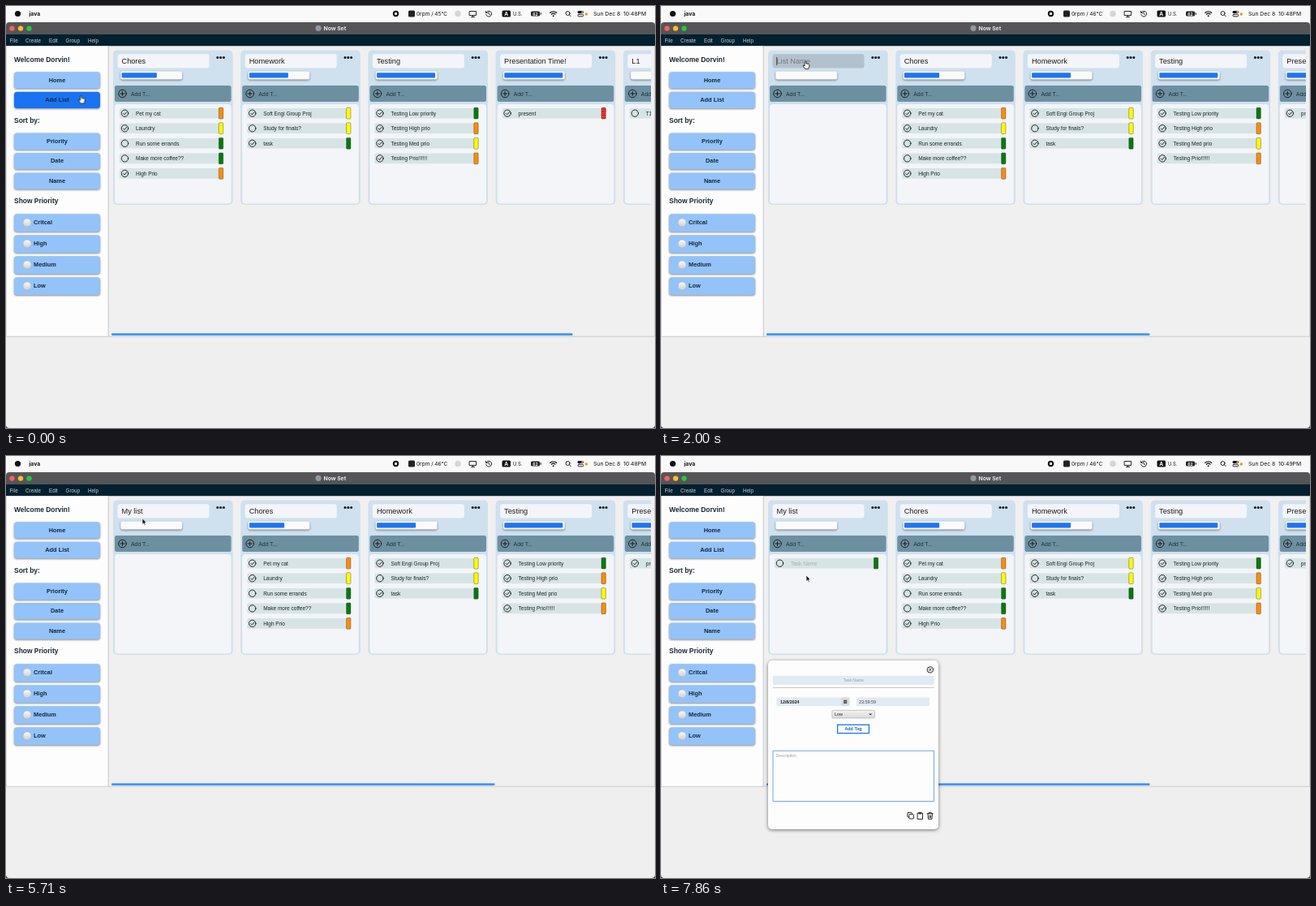
These frames come from a looping animation (800 by 520 pixels, 8 s). An HTML page:

```html
<!DOCTYPE html>
<html lang="en">
<head>
<meta charset="utf-8">
<title>To-do board</title>
<style>
  html, body { margin: 0; width: 100%; height: 100%; overflow: hidden; background: #efefef; }
  svg { display: block; width: 800px; height: 520px; }
  text { font-family: "Liberation Sans", Arial, sans-serif; white-space: pre; }
  .sys { font: 6.8px Inter, sans-serif; fill: #111; }
  .b { font-weight: bold; }
  .mid { text-anchor: middle; }
  .menu { font-size: 6.3px; fill: #c3ccd1; }
  .head { font-size: 8.45px; font-weight: bold; fill: #1b2733; }
  .label { font-size: 7.4px; font-weight: bold; fill: #12283f; }
  .title { font-size: 9.2px; fill: #1c1c1c; }
  .task { font-size: 6.5px; fill: #1c2426; }
  .addText { font-size: 6.9px; fill: #1f323d; }
  .small { font-size: 5.4px; fill: #222; }
  .hint { font-size: 5px; fill: #9a9fa3; }
  .btn { fill: #93c3f9; filter: drop-shadow(0 1px 1px #0007); }
  .bar { fill: #fafafa; filter: drop-shadow(0 1px 1px #0007); }
  .field { fill: #f3f5f9; }
  .add { fill: #6d90a1; }
  .line { fill: none; stroke: #111; stroke-width: .9; stroke-linecap: round; stroke-linejoin: round; }
</style>
</head>
<body>
<svg id="stage" viewBox="0 0 800 520" xmlns="http://www.w3.org/2000/svg"></svg>
<script>
const LOOP = 8000, TICK = 1000 / 7, TICKS = 56, PITCH = 157.2;
const NORMAL = '#6d90a1', PRESSED = '#02517f';
const ORANGE = '#ff8c0a', YELLOW = '#fffb00', GREEN = '#067a0c', RED = 'url(#critical)';

const rect = (x, y, w, h, fill, r = 0, extra = '') =>
  `<rect x="${x}" y="${y}" width="${w}" height="${h}" rx="${r}" fill="${fill}" ${extra}/>`;
const circle = (x, y, r, fill, extra = '') =>
  `<circle cx="${x}" cy="${y}" r="${r}" fill="${fill}" ${extra}/>`;
const text = (x, y, cls, s, extra = '') =>
  `<text x="${x}" y="${y}" class="${cls}" ${extra}>${s}</text>`;
const line = (d, extra = '') => `<path class="line" d="${d}" ${extra}/>`;

const defs = `<defs>
  <clipPath id="board"><rect x="127" y="50" width="668" height="352"/></clipPath>
  <linearGradient id="knob" x2="0" y2="1"><stop stop-color="#fafafa"/><stop offset="1" stop-color="#cfcfcf"/></linearGradient>
  <linearGradient id="combo" x2="0" y2="1"><stop stop-color="#f4f4f4"/><stop offset="1" stop-color="#d8d8d8"/></linearGradient>
  <pattern id="critical" width="2.6" height="2.6" patternUnits="userSpaceOnUse">
    <rect width="2.6" height="2.6" fill="#f01818"/><circle cx="1.3" cy="1.3" r=".45" fill="#ffd0c8"/></pattern>
</defs>`;

function menuBar() {
  return rect(0, 0, 800, 24, '#f9f9f9') +
    circle(14.5, 9.5, 3.6, '#111') +
    text(28.5, 12, 'sys b', 'java') +
    circle(480.5, 9.5, 3.7, '#111') + rect(479.1, 8.1, 2.8, 2.8, '#fff', .5) +
    rect(496, 5.5, 8, 8, '#222', 1.5) +
    text(506, 12, 'sys', '0rpm / 45°C', 'id="cool" style="font-size:6.5px"') +
    text(506, 12, 'sys', '0rpm / 46°C', 'id="warm" style="font-size:6.5px"') +
    circle(557, 9.5, 3.8, '#d6d6d6') +
    line('M571.5 6.5h8v5h-8zM573.5 13.5h4M575.5 11.5v2') +
    line('M592 8a3.5 3.5 0 1 1-.3 2.5M591.5 6.5v2h2M595 7.5v2.2l1.5 1') +
    rect(611.5, 5.5, 10.5, 8, '#111', 1.5) +
    text(616.8, 12, 'sys b mid', 'A', 'style="fill:#fff;font-size:6.5px"') +
    text(625, 12, 'sys', 'U.S.', 'style="font-size:6px"') +
    rect(647, 6.5, 11, 6, '#222', 1.5) + rect(658.6, 8.3, 1.2, 2.4, '#222') +
    text(652.5, 11.5, 'sys b mid', '62', 'style="fill:#fff;font-size:5px"') +
    line('M670.7 8.3a6 6 0 0 1 8 0M672.3 10.2a3.6 3.6 0 0 1 4.8 0', 'style="stroke-width:1.2"') +
    circle(674.7, 12.2, 1, '#111') +
    line('M694.4 10.9l1.8 1.8') + circle(692.5, 9, 2.5, 'none', 'class="line"') +
    rect(704.5, 6, 7.5, 3, '#111', 1.5) + circle(710.3, 7.5, .9, '#fff') +
    rect(704.9, 10.3, 6.8, 2.6, 'none', 1.3, 'class="line"') +
    circle(715.3, 10, 1.7, '#f5920b') +
    text(724, 12, 'sys', 'Sun Dec 8') +
    text(761, 12, 'sys', '10:48PM', 'id="early"') + text(761, 12, 'sys', '10:49PM', 'id="late"');
}

function windowFrame() {
  const menus = [[4.5, 'File'], [24, 'Create'], [53, 'Edit'], [73.5, 'Group'], [101, 'Help']];
  return `<path d="M0 36V24q0-4 4-4H796q4 0 4 4V36z" fill="#555457"/>` +
    ['#ff5f57', '#febc2e', '#28c840'].map((c, i) => circle(7.5 + 10.5 * i, 27.6, 3.2, c)).join('') +
    circle(385, 27.3, 3.6, '#8e9ba3') +
    text(391.5, 29.9, 'sys b', 'Now Set', 'style="fill:#e8e8e8"') +
    rect(0, 35, 800, 14.5, '#02202f') +
    menus.map(([x, s]) => text(x, 44.7, 'menu', s)).join('') +
    rect(0, 49.5, 800, 357.5, '#f0f0f0') +
    rect(0, 49.5, 126, 357.5, '#fdfdfd') +
    rect(125.7, 49.5, .9, 357.5, '#bfc3c7') +
    rect(0, 406.8, 800, .8, '#c4c4c4') +
    rect(0, 49.5, .6, 357.5, '#c4c4c4') + rect(799.3, 49.5, .7, 357.5, '#c9c9c9') +
    '<path d="M0 516q0 4 4 4H0zM800 516q0 4-4 4h4z" fill="#333"/>';
}

function sidebar() {
  const button = (cy, s, id = '') =>
    rect(10, cy - 9.7, 106, 20.3, '', 3.5, `class="btn" ${id}`) + text(63, cy + 2.6, 'label mid', s);
  const toggle = (s, i) => {
    const cy = 267 + 26 * i;
    return rect(10, cy - 10.8, 106, 21.8, '', 3.5, 'class="btn"') +
      circle(26, cy, 5, 'url(#knob)', 'stroke="#b5b5b5" stroke-width=".6"') + text(34, cy + 2.3, 'label', s);
  };
  return text(10, 68.6, 'head', 'Welcome Dorvin!') +
    button(91, 'Home') + button(115.4, 'Add List', 'id="addList"') +
    text(10, 143.9, 'head', 'Sort by:') +
    button(166.3, 'Priority') + button(190.7, 'Date') + button(215.2, 'Name') +
    text(10, 243.3, 'head', 'Show Priority') +
    ['Critcal', 'High', 'Medium', 'Low'].map(toggle).join('');
}

function taskRow([name, done, color], i) {
  const cy = 132.2 + 18.55 * i;
  return rect(140, cy - 6.3, 128, 12.6, '#d6e4e6', 2) +
    circle(146.5, cy, 4.2, 'none', 'class="line"') +
    (done ? line(`M144.7 ${cy + .2}l1.4 1.5 2.6-3.2`) : '') +
    text(160, cy + 2.3, 'task', name) +
    rect(262.4, cy - 6.9, 5.3, 13.8, color, 1, 'stroke="#000" stroke-opacity=".5" stroke-width=".6"');
}

function card(slot, title, tasks, extra = '') {
  const ratio = tasks.length ? tasks.filter(t => t[1]).length / tasks.length : 0;
  return `<g transform="translate(${slot * PITCH})" ${extra}>` +
    rect(132, 54.5, 147.6, 190.5, '#cfe0ee', 5) +
    rect(137.5, 59.2, 113, 17.2, '', 3, 'class="field"') +
    text(142.5, 71.3, 'title', title) +
    [260.8, 264.6, 268.4].map(x => circle(x, 63.6, 1.5, '#111')).join('') +
    rect(141.3, 80.5, 75.8, 10, '', 2, 'class="bar"') +
    (ratio ? rect(142.7, 82.2, 72 * ratio, 6.2, '#1d75f0', .8) : '') +
    rect(134, 98, 143.6, 20, '', 2.5, 'class="add"') +
    circle(143.5, 108, 4.8, 'none', 'class="line"') + line('M141 108h5M143.5 105.5v5') +
    text(154, 110.5, 'addText', 'Add T...') +
    rect(134, 121, 143.6, 122.5, '#f3f5f8', 4) +
    tasks.map(taskRow).join('') + '</g>';
}

const lists = [
  ['Chores', [['Pet my cat', 1, ORANGE], ['Laundry', 1, YELLOW], ['Run some errands', 0, GREEN],
    ['Make more coffee??', 0, GREEN], ['High Prio', 1, ORANGE]]],
  ['Homework', [['Soft Engi Group Proj', 1, YELLOW], ['Study for finals?', 0, YELLOW], ['task', 1, GREEN]]],
  ['Testing', [['Testing Low priority', 1, GREEN], ['Testing High prio', 1, ORANGE],
    ['Testing Med prio', 1, YELLOW], ['Testing Prio!!!!!!', 1, ORANGE]]],
  ['Presentation Time!', [['present', 1, RED]]],
  ['L1', [['T1', 0, GREEN]]]
];
const NAME = 'My list';

function board() {
  return `<g clip-path="url(#board)"><g id="lists">${lists.map((l, i) => card(i, ...l)).join('')}</g>` +
    card(0, '', [], 'id="fresh"') +
    text(142.5, 71.3, 'title', 'List Name', 'id="prompt" style="fill:#737a80"') +
    text(142.5, 71.3, 'title', [...NAME].map(c => `<tspan>${c}</tspan>`).join(''), 'id="typed"') +
    rect(142.4, 63, .8, 10, '#222', 0, 'id="caret"') +
    `<g id="newTask">${taskRow(['<tspan fill="#a3b0b3">Task Name</tspan>', 0, GREEN], 0)}</g></g>` +
    rect(130, 403.2, 568.5, 2.7, '#3f97f3', 1, 'id="scroll"');
}

function popup() {
  const field = '#e1ebf4';
  return '<g id="popup">' +
    rect(132, 252, 210, 208, '#fdfdfd', 5, 'style="filter:drop-shadow(0 1px 2px #0008)"') +
    circle(331.8, 263.4, 3.7, 'none', 'class="line"') + line('M330.4 262l2.8 2.8m0-2.8l-2.8 2.8') +
    rect(137.7, 270.7, 199, 11.3, field, 1.5) + text(237.2, 278.2, 'hint mid', 'Task Name') +
    rect(137.7, 285.2, 199, .7, '#b4b4b4') +
    rect(142.5, 297.5, 79, 10.5, field, 1) + text(147, 304.7, 'small b', '12/8/2024', 'style="font-size:5.3px"') +
    rect(221.5, 297.5, 11, 10.5, '#d3dde5', 1) + rect(225, 300.7, 4.2, 4.2, '#444', .5) +
    line('M225.4 302.3h3.4M225.4 303.7h3.4', 'style="stroke:#d3dde5;stroke-width:.4"') +
    rect(241, 297.5, 90, 10.5, field, 1) + text(244, 304.7, 'small', '23:59:59', 'style="fill:#444"') +
    rect(210.8, 313.4, 52.7, 9.6, 'url(#combo)', 1.5, 'stroke="#b2b2b2" stroke-width=".7"') +
    text(214, 320.2, 'small', 'Low') + '<path d="M256.2 317.4h4l-2 2.2z" fill="#333"/>' +
    rect(217.6, 331.2, 38.8, 10.4, '#fff', 0, 'stroke="#1a75e6" stroke-width="1.3"') +
    text(237, 338.3, 'small b mid', 'Add Tag', 'style="fill:#1a66d0"') +
    rect(138, 363.2, 198.4, 62.2, '#fdfdfd', 0, 'stroke="#5a9edb" stroke-width=".9"') +
    text(141.7, 370.6, 'hint', 'Description') +
    rect(303.8, 439.4, 5.6, 5.6, 'none', 1, 'class="line"') +
    rect(305.8, 441.4, 5.6, 5.6, '#fdfdfd', 1, 'style="stroke:#111;stroke-width:.9"') +
    line('M316.5 440h6v7.4h-6zM318.3 439.3h2.4v1.6h-2.4z') +
    line('M328.2 440.7h7M330.4 440.5v-1.3h2.6v1.3M329 441l.4 6.3h4.6l.4-6.3M331 443v2.6M332.4 443v2.6') +
    '</g>';
}

const pointer = `<g id="pointer">
  <path id="hand" d="M-.9.6Q0-.6.9.6V3.2Q1.8 2.5 2.5 3.4Q3.4 2.9 3.9 3.8Q4.9 3.6 4.9 4.8Q4.9 7.4 3.8 8.8V9.6H-.4Q-1.2 8.2-3 6Q-3.3 4.7-2 5L-.9 6z"
    fill="#fff" stroke="#111" stroke-width=".8" stroke-linejoin="round"/>
  <path id="arrow" d="M0 0V7.4L1.7 5.9L2.9 8.6L4.2 8L3 5.4H5.3z"
    fill="#111" stroke="#fff" stroke-width=".7" stroke-linejoin="round"/></g>`;

const stage = document.getElementById('stage');
stage.innerHTML = defs + menuBar() + windowFrame() + sidebar() + board() + popup() + pointer;
const $ = s => stage.querySelector(s);

// Hold each value from its tick until the next one; a small lead absorbs rounded times.
function play(el, prop, steps) {
  const frames = steps.map(([k, v]) =>
    ({ offset: Math.max(0, k * TICK - 6) / LOOP, [prop]: v, easing: 'steps(1, end)' }));
  frames.push({ offset: 1, [prop]: steps[steps.length - 1][1] });
  el.animate(frames, { duration: LOOP, iterations: Infinity });
}

// Visibility flips at every given tick, starting hidden.
function reveal(el, ...ticks) {
  const steps = ticks.map((k, i) => [k, i % 2 ? 'hidden' : 'visible']);
  play(el, 'visibility', ticks[0] ? [[0, 'hidden'], ...steps] : steps);
}

const ADDED = 2, OPENED = 47;
play($('#lists'), 'transform', [[0, 'translate(0px)'], [ADDED, `translate(${PITCH}px)`]]);
play($('#scroll'), 'width', [[0, '568.5px'], [ADDED, '472.5px']]);
reveal($('#fresh'), ADDED);
reveal($('#cool'), 0, ADDED);
reveal($('#warm'), ADDED);
reveal($('#early'), 0, 54);
reveal($('#late'), 54);
reveal($('#newTask'), OPENED);
reveal($('#popup'), OPENED);

play($('#addList'), 'fill', [[0, '#1a73f0'], [8, '#93c3f9']]);
play($('#fresh .field'), 'fill', [[0, '#f3f5f9'], [11, '#b3c1cc'], [40, '#f3f5f9']]);
play($('#fresh .add'), 'fill', [[0, NORMAL], [43, PRESSED], [50, NORMAL]]);

// Typing
const keyTicks = [25, 26, 28, 30, 31, 32, 34], typed = $('#typed');
reveal($('#prompt'), ADDED, keyTicks[0]);
typed.querySelectorAll('tspan').forEach((el, i) => reveal(el, keyTicks[i]));
play($('#caret'), 'transform', [[0, 'translate(0px)'], ...keyTicks.map((k, i) =>
  [k, `translate(${typed.getSubStringLength(0, i + 1)}px)`])]);
reveal($('#caret'), 13, 17, 20, 23, 25, 38, 42, OPENED);

// Pointer: waypoints of tick, x, y
const path = [[0, 92.5, 110.5], [4, 91.5, 112], [6, 91.5, 112], [12, 178, 68], [15, 178, 68], [19, 179, 72.7],
  [36, 179, 72.7], [40, 168, 76.8], [44, 138, 109.5], [48, 138, 109.5], [53, 179, 147], [TICKS, 179, 147]];
function pointerAt(k) {
  const i = path.findIndex(p => p[0] > k), [k0, x0, y0] = path[i - 1], [k1, x1, y1] = path[i];
  const p = (k - k0) / (k1 - k0);
  return `translate(${x0 + (x1 - x0) * p}px, ${y0 + (y1 - y0) * p}px)`;
}
play($('#pointer'), 'transform', Array.from({ length: TICKS }, (_, k) => [k, pointerAt(k)]));
reveal($('#hand'), 0, 8, 11, 40, 43, 50);
reveal($('#arrow'), 8, 11, 40, 43, 50);
</script>
</body>
</html>
```
